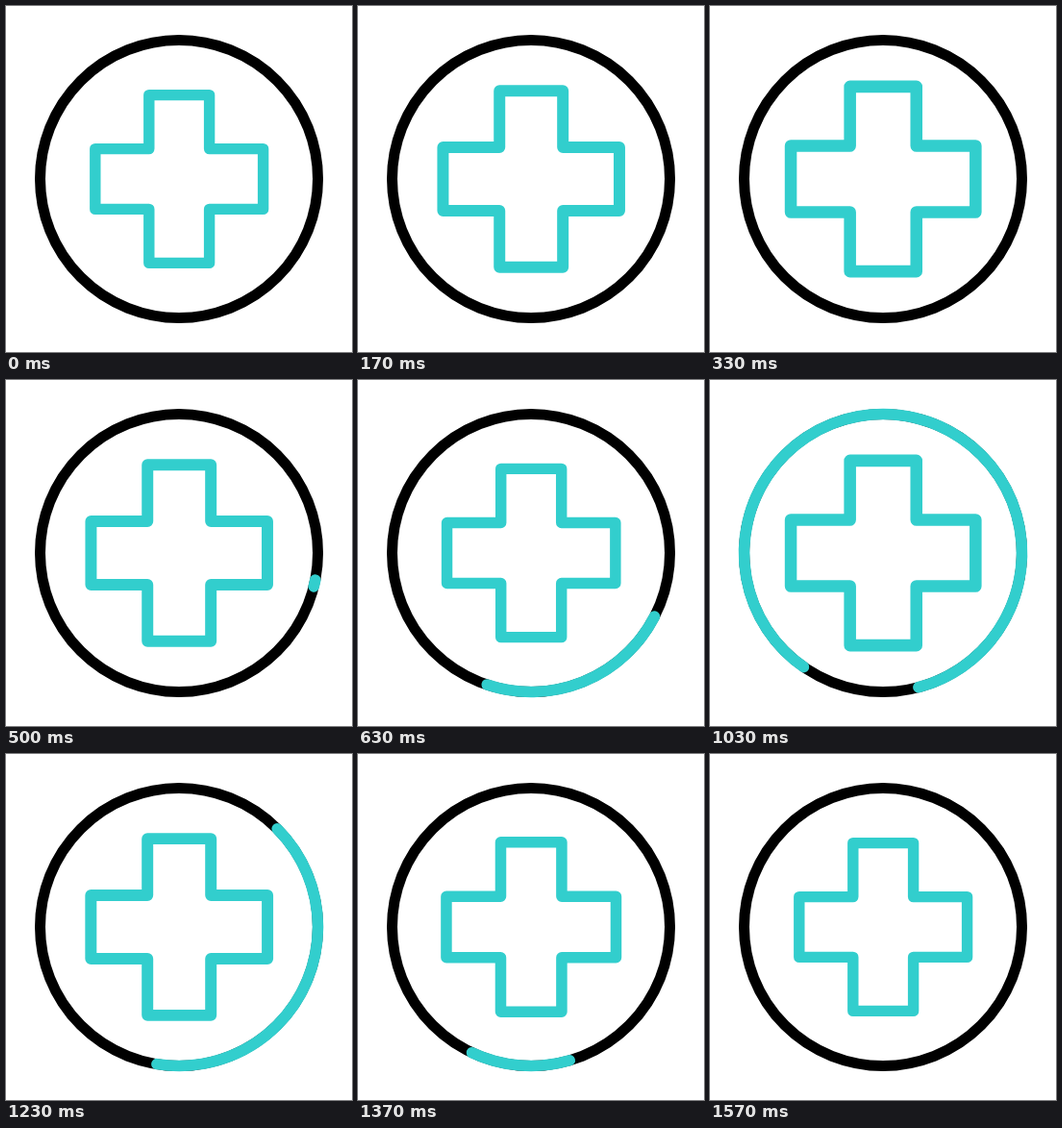
Animation, 360 px wide and 360 px high, one loop 1.67 s. Source, as an HTML page with a canvas:

```html
<!DOCTYPE html>
<html lang="en">
<head>
<meta charset="utf-8">
<title>Medical cross</title>
<style>
  html, body { margin: 0; width: 100%; height: 100%; overflow: hidden; background: #fff; }
  canvas { display: block; width: 360px; height: 360px; }
</style>
</head>
<body>
<canvas id="stage" width="360" height="360"></canvas>
<script>
const ctx = document.getElementById('stage').getContext('2d');
const LOOP = 1670;
const TICK = 100 / 3;
const TEAL = '#32cecd';
const RADIUS = 144.5;
const TAU = Math.PI * 2;

// Cross beats: [tick, scale]
const BEATS = [[0, 1], [10, 1.1], [20, 1], [30.7, 1.1], [43.5, 1]];

function ease(from, to, tick) {
  const u = Math.min(1, Math.max(0, (tick - from) / (to - from)));
  return u * u * (3 - 2 * u);
}

function crossScale(tick) {
  for (let i = 1; i < BEATS.length; i++) {
    const [start, a] = BEATS[i - 1];
    const [end, b] = BEATS[i];
    if (tick <= end) return a + (b - a) * ease(start, end, tick);
  }
  return 1;
}

function drawArc(from, to, color, width) {
  ctx.beginPath();
  ctx.arc(180, 180, RADIUS, from, to);
  ctx.strokeStyle = color;
  ctx.lineWidth = width;
  ctx.stroke();
}

function drawRing(tick) {
  drawArc(0, TAU, '#000', 11);
  const head = ease(14.2, 29.8, tick);
  const tail = ease(26.8, 44.8, tick);
  if (head - tail < 0.0005) return;
  const turn = 4 * (tick - 12.2) * Math.PI / 180;
  drawArc(turn + tail * TAU, turn + head * TAU, TEAL, 11.6);
}

function drawCross(scale) {
  const a = 31.4, b = 87.4;
  ctx.save();
  ctx.translate(180.2, 180);
  ctx.scale(scale, scale);
  ctx.beginPath();
  for (let i = 0; i < 4; i++) {
    ctx.lineTo(-a, -b);
    ctx.lineTo(a, -b);
    ctx.lineTo(a, -a);
    ctx.rotate(Math.PI / 2);
  }
  ctx.closePath();
  ctx.strokeStyle = TEAL;
  ctx.lineWidth = 11.4;
  ctx.stroke();
  ctx.restore();
}

function draw(now) {
  const tick = Math.floor((now % LOOP + 3.4) / TICK);
  ctx.fillStyle = '#fff';
  ctx.fillRect(0, 0, 360, 360);
  ctx.lineCap = ctx.lineJoin = 'round';
  drawRing(tick);
  drawCross(crossScale(tick));
}

const begin = performance.now();
function loop() {
  draw(performance.now() - begin);
  requestAnimationFrame(loop);
}
loop();
</script>
</body>
</html>
```
